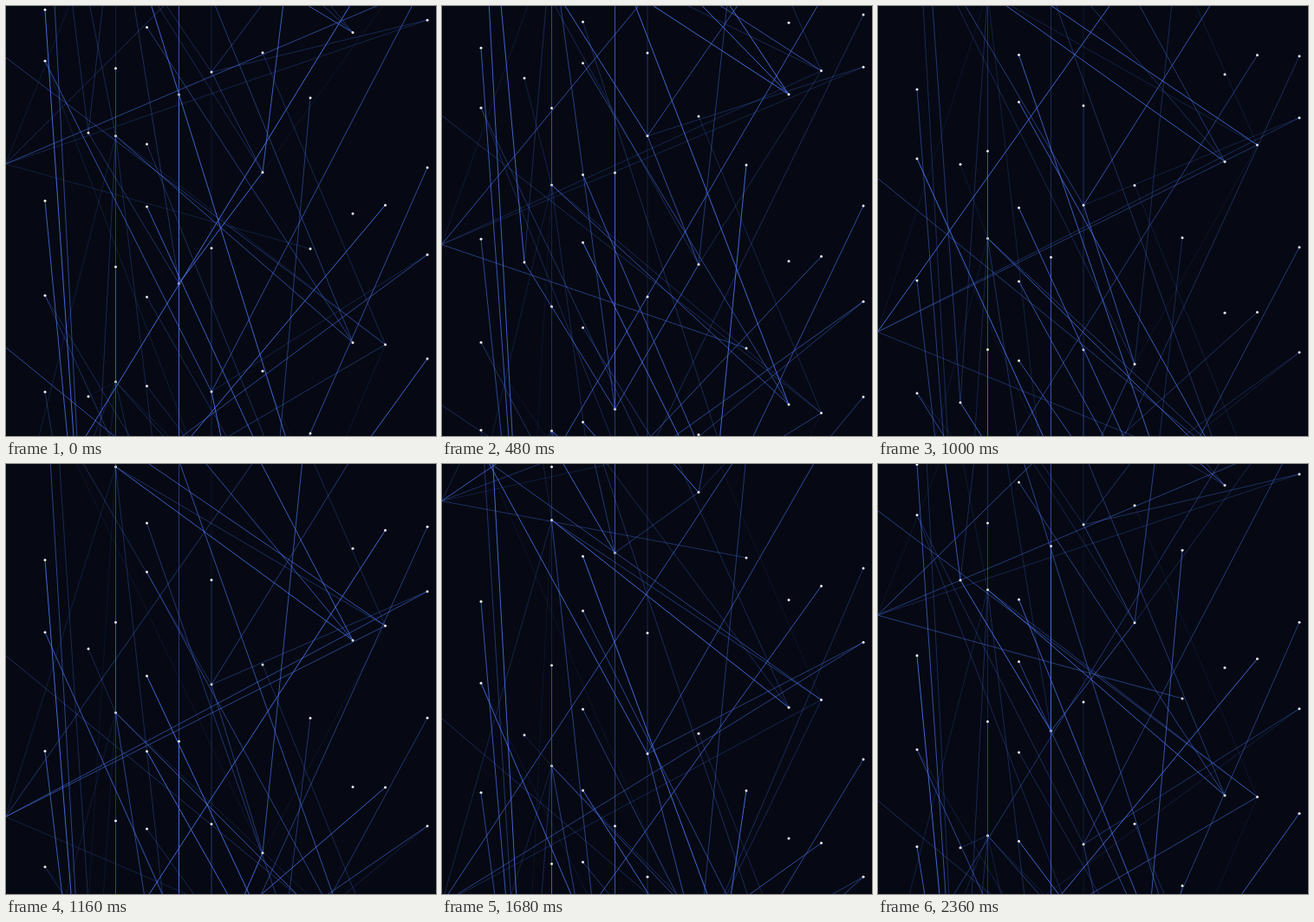
An HTML page with a canvas for the animation above (2400 ms loop, 496 px wide and 495 px high).

```html
<!DOCTYPE html>
<html>
<head>
<meta charset="utf-8">
<style>
html, body { margin: 0; width: 100%; height: 100%; overflow: hidden; background: #060913; }
canvas { display: block; }
</style>
</head>
<body>
<canvas id="stage" width="496" height="495"></canvas>
<script>
const ctx = document.getElementById('stage').getContext('2d');
const LOOP = 2400, TOP = -255, BOTTOM = 750, GENERATIONS = 8;
const SLOWDOWN = 1 / 1188; // extra loops per pixel for a column's second node

// Every loop each column drops a fast node (a), and one loop later a slow one (A).
const columns = {
  a: { x: -0.5, age: 0.941, speed: 464 },
  b: { x: 45, age: 0.178, speed: 270 },
  c: { x: 95, age: 0.538, speed: 745 },
  d: { x: 126.5, age: 0.429, speed: 283 },
  e: { x: 162.5, age: 0.352, speed: 206.6 },
  f: { x: 199.5, age: 0.793, speed: 724 },
  g: { x: 237, age: 0.899, speed: 368 },
  h: { x: 296, age: 0.842, speed: 530 },
  i: { x: 351, age: 0.934, speed: 572 },
  j: { x: 400, age: 0.799, speed: 357 },
  k: { x: 437.5, age: 0.636, speed: 394 },
  l: { x: 486, age: 1.004, speed: 270 }
};
const nodes = Object.keys(columns).flatMap(name => [name, name.toUpperCase()]);

// Which nodes are joined, grouped by how strongly the thread glows
const threads = [
  ['aK Ak Bc bg cf dj ej Ej Ff fh gh gL hI', 0.6],
  ['ai ak al Dd df dk gl', 0.38],
  ['ad bh cd Cd Gg Hk hk', 0.2]
].flatMap(([pairs, glow]) => pairs.split(' ').map(([from, to]) => ({ from, to, glow })));

const random = seed => {
  const s = Math.sin(seed * 127.1 + 11.7) * 43758.5453;
  return s - Math.floor(s);
};

function place(node, time) {
  const { x, age, speed } = columns[node.toLowerCase()];
  const slow = node !== node.toLowerCase();
  const fallen = slow ? (age + time - 1) / (1 / speed + SLOWDOWN) : (age + time) * speed;
  return [x, Math.min(BOTTOM, Math.max(TOP, TOP + fallen))];
}

// Whole cycles per loop, so the flicker joins up
function flicker(seed, u) {
  const cycles = 2 + Math.floor(random(seed) * 4);
  return 1 + 0.5 * Math.sin(2 * Math.PI * (cycles * u + random(seed + 0.5)));
}

function drawGeneration(n, u) {
  threads.forEach(({ from, to, glow }, i) => {
    ctx.globalAlpha = glow * flicker(i * 10 + n, u);
    ctx.beginPath();
    ctx.moveTo(...place(from, u + n));
    ctx.lineTo(...place(to, u + n));
    ctx.stroke();
  });
  ctx.globalAlpha = 1;
  for (const node of nodes) {
    const [x, y] = place(node, u + n);
    if (x < 0) continue;
    ctx.beginPath();
    ctx.arc(x, y, 1.5, 0, 2 * Math.PI);
    ctx.fill();
  }
}

function draw() {
  const u = performance.now() % LOOP / LOOP;
  ctx.clearRect(0, 0, 496, 495);
  ctx.strokeStyle = '#4a74ee';
  ctx.fillStyle = '#e6eaf6';
  for (let n = -1; n < GENERATIONS; n++) drawGeneration(n, u);
  requestAnimationFrame(draw);
}
draw();
</script>
</body>
</html>
```
